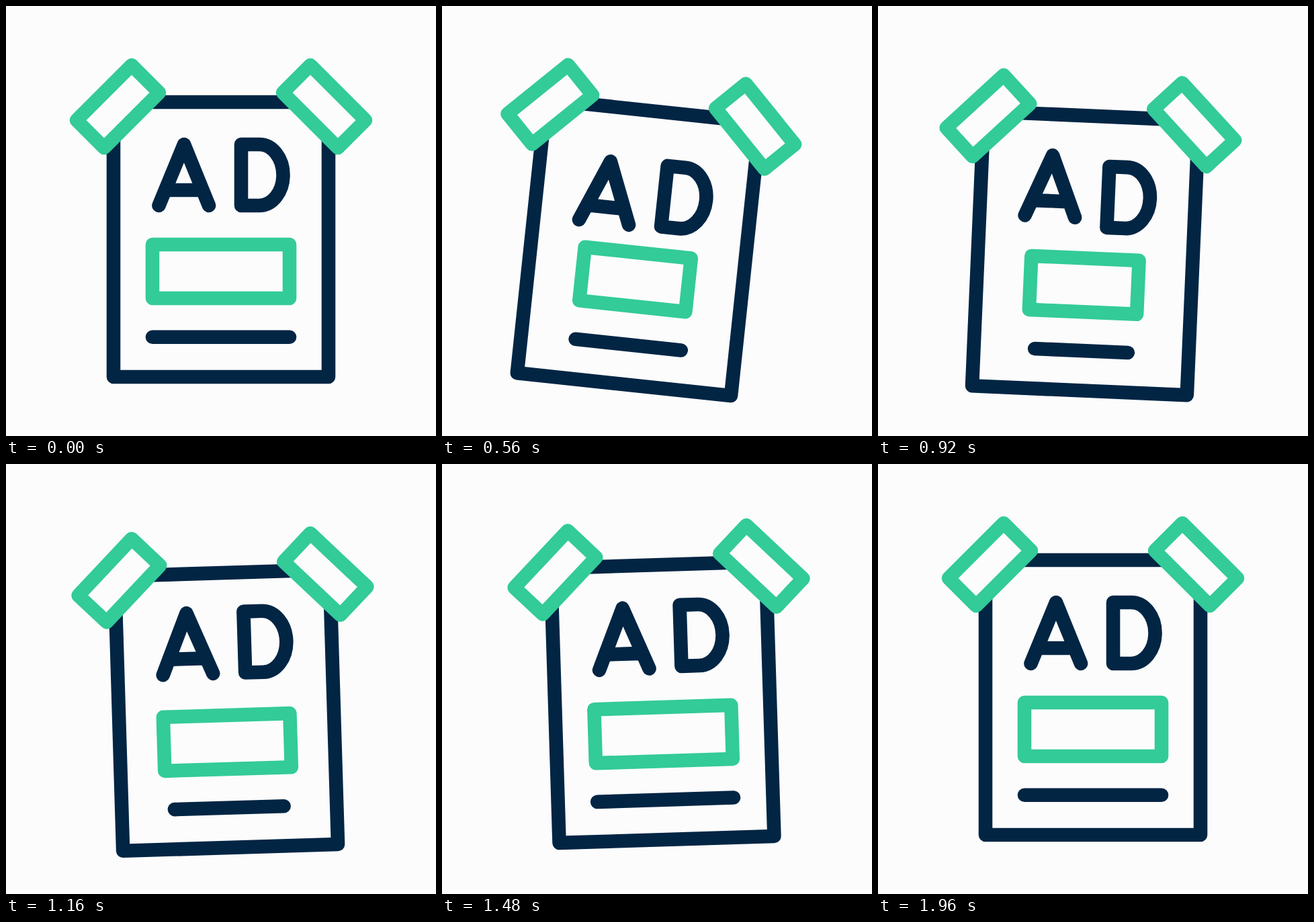
Write an HTML page that moves like this. It is 640 by 640 pixels and loops after 2000 ms.

```html
<!DOCTYPE html>
<html lang="en">
<head>
<meta charset="utf-8">
<title>Ad poster</title>
<style>
  html, body { margin: 0; width: 100%; height: 100%; overflow: hidden; background: #fcfcfc; }
  svg { display: block; width: 100%; height: 100%; }
  path { fill: none; stroke: #022544; stroke-width: 20.6; stroke-linecap: round; stroke-linejoin: round; }
  .green { stroke: #33cb98; }
  .tape { fill: #fcfcfc; }
</style>
</head>
<body>
<svg viewBox="0 0 640 640">
  <g id="poster">
    <path d="M160 143H480V552H160Z"/>
    <path id="a" d="M227.500 297L265 206L302 297M241 274H289"/>
    <path id="d" d="M350 206H377A35.500 45.500 0 0 1 377 297H350Z"/>
    <path id="box" class="green"/>
    <path id="line"/>
    <path class="green tape" d="M187 88L228 129L146 211L105 170Z"/>
    <path class="green tape" d="M453 88L535 170L494 211L412 129Z"/>
  </g>
</svg>
<script>
  const LOOP = 2000, STEP = 40, LETTER_DELAY = 160, HALF = 102;
  const [poster, a, d, box, line] =
    ['poster', 'a', 'd', 'box', 'line'].map(id => document.getElementById(id));

  // Ease in and out from 0 at start to 1 at end.
  function ramp(t, start, end) {
    const x = Math.min(1, Math.max(0, (t - start) / (end - start)));
    return x * x / (x * x + (1 - x) * (1 - x));
  }

  // Rise from 0 to 1 at the peak, then back to 0.
  const pulse = (t, start, peak, end) => ramp(t, start, peak) - ramp(t, peak, end);

  const swing = t => 6.1 * pulse(t, 0, 600, 1280) - 2.1 * pulse(t, 600, 1280, 1960);
  const drop = t => 20.7 * pulse(t, 0, 960, 1860);
  const bounce = t => 18.3 * pulse(t, 0, 560, 1060) - 5 * pulse(t, 560, 1060, 1560);
  const boxHalf = t => HALF - 24.6 * pulse(t, 0, 730, 1450);
  const lineHalf = t => HALF - 33 * pulse(t, 120, 850, 1560);

  const move = (el, y, turn = 0) =>
    el.setAttribute('transform', `translate(0 ${y}) rotate(${turn} 320 88)`);

  function draw(t) {
    move(poster, drop(t), swing(t));
    move(a, bounce(t));
    move(d, bounce(t - LETTER_DELAY));
    const b = boxHalf(t), l = lineHalf(t);
    box.setAttribute('d', `M${320 - b} 355H${320 + b}V435H${320 - b}Z`);
    line.setAttribute('d', `M${320 - l} 492.7H${320 + l}`);
  }

  function tick() {
    draw(Math.floor(performance.now() % LOOP / STEP) * STEP);
    requestAnimationFrame(tick);
  }
  tick();
</script>
</body>
</html>
```
